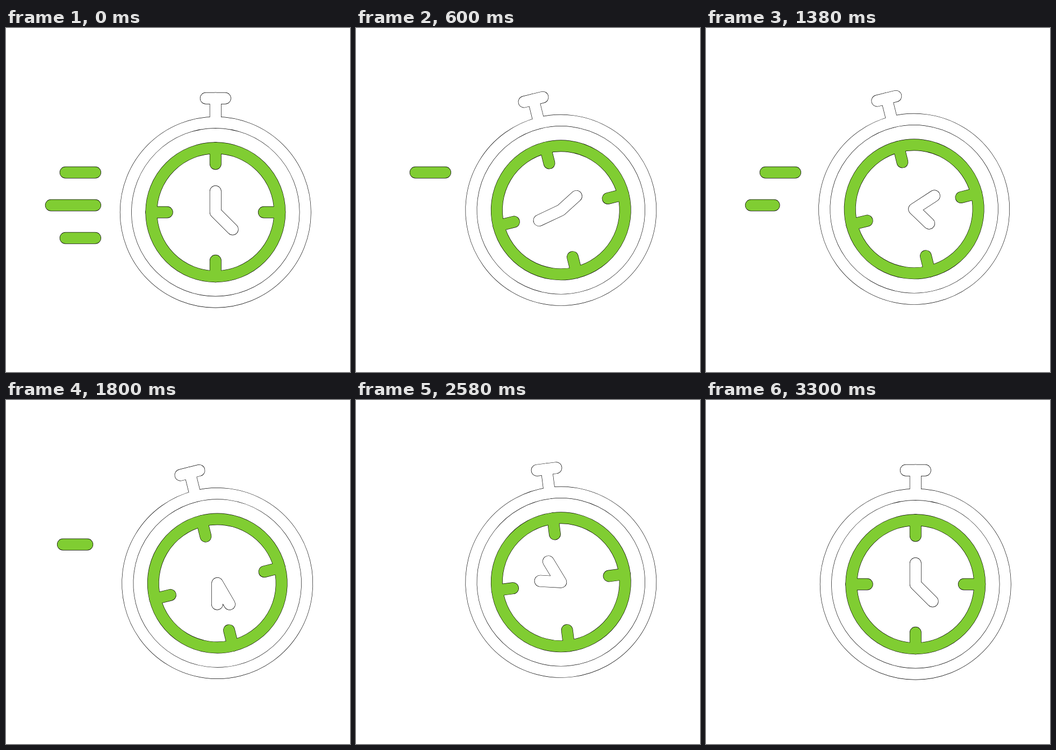
These frames come from a looping animation (640 px wide and 640 px high, 3.6 s). An HTML page with a canvas:

```html
<!DOCTYPE html>
<html lang="en">
<head>
<meta charset="utf-8">
<title>Stopwatch</title>
<style>
  html, body { margin: 0; width: 100%; height: 100%; overflow: hidden; background: #fff; }
  canvas { display: block; width: 640px; height: 640px; }
</style>
</head>
<body>
<canvas id="stage" width="640" height="640"></canvas>
<script>
const ctx = document.getElementById('stage').getContext('2d');
const LOOP = 3600, STEP = 20, TURN = Math.PI * 2;
const GREEN = '#80cd32', WHITE = '#fff', INK = '#000';
const THICK = 20.6, LINE = 0.65;
const CENTER = { x: 389.8, y: 342.7 };

// The watch rattles round four corners, eight times, from rest to rest.
const SHAKE = { start: 487, period: 330, rounds: 8 };
const CORNERS = [
  { at: 0, x: 4.2, y: -0.7 },
  { at: 0.3, x: -10.3, y: -5.6 },
  { at: 0.5, x: -1.8, y: 2.5 },
  { at: 0.8, x: -3, y: -9.7 },
  { at: 1, x: 4.2, y: -0.7 }
];
const REST = { x: 0, y: 0 };

// in: start of growth, out: start of the retreat to the left
const BAR_END = 83.7, BAR_RIGHT = 166, GROW = 80, RETREAT = 480;
const BARS = [
  { y: 268.8, left: 110.7, runs: [{ in: -GROW, out: 1714 }] },
  { y: 329.7, left: BAR_END, runs: [{ in: -GROW, out: 40 }, { in: 1000, out: 1150 }] },
  { y: 390.7, left: 110.7, runs: [{ in: -GROW, out: 100 }, { in: 1930, out: 2073 }] }
];

const clamp = v => Math.min(1, Math.max(0, v));
const mix = (a, b, p) => a + (b - a) * p;
const span = (t, a, b) => clamp((t - a) / (b - a));
const smooth = p => (1 - Math.cos(Math.PI * p)) / 2;

function shakeOffset(t) {
  const round = (t - SHAKE.start) / SHAKE.period;
  if (round <= 0 || round >= SHAKE.rounds) return REST;
  const phase = round % 1;
  const i = CORNERS.findIndex(corner => corner.at > phase);
  const first = round < 1 && i === 1;
  const last = round > SHAKE.rounds - 1 && i === CORNERS.length - 1;
  const from = first ? REST : CORNERS[i - 1];
  const to = last ? REST : CORNERS[i];
  const p = span(phase, CORNERS[i - 1].at, CORNERS[i].at);
  return { x: mix(from.x, to.x, p), y: mix(from.y, to.y, p) };
}

function line(...points) {
  const path = new Path2D();
  points.forEach(([x, y], i) => i ? path.lineTo(x, y) : path.moveTo(x, y));
  return path;
}

function ring(radius) {
  const path = new Path2D();
  path.arc(0, 0, radius, 0, TURN);
  return path;
}

// Thick strokes merged into one outlined shape.
function merged(paths, color) {
  ctx.lineCap = ctx.lineJoin = 'round';
  for (const [ink, width] of [[INK, THICK + 2 * LINE], [color, THICK]]) {
    ctx.strokeStyle = ink;
    ctx.lineWidth = width;
    paths.forEach(path => ctx.stroke(path));
  }
}

const polar = (r, degrees) => {
  const a = degrees * TURN / 360;
  return [r * Math.sin(a), -r * Math.cos(a)];
};

const CASE = [ring(167), line([0, -167], [0, -212]), line([-18, -212], [18, -212])];
const DIAL = [ring(119.5), ...[0, 90, 180, 270].map(a => line(polar(119.5, a), polar(90, a)))];

function drawBars(t) {
  for (const { y, left, runs } of BARS) {
    for (const run of runs) {
      const grown = span(t, run.in, run.in + GROW);
      const gone = span(t, run.out, run.out + RETREAT);
      if (grown === 0 || gone === 1) continue;
      const from = mix(mix(BAR_RIGHT, left, grown), BAR_END, gone);
      merged([line([from, y], [mix(BAR_RIGHT, BAR_END, gone), y])], GREEN);
    }
  }
}

function drawWatch(t) {
  const offset = shakeOffset(t);
  const tilt = -14 * smooth(span(t, 40, SHAKE.start)) * (1 - smooth(span(t, 1950, 3240)));
  const sweep = 360 * span(t, 40, 3300);

  ctx.save();
  ctx.translate(CENTER.x + offset.x, CENTER.y + offset.y);
  ctx.rotate(tilt * TURN / 360);
  merged(CASE, WHITE);
  merged(DIAL, GREEN);
  merged([line(polar(38.7, sweep), [0, 0], polar(45, 135 + 2 * sweep))], WHITE);
  ctx.restore();
}

function frame() {
  const t = Math.floor(performance.now() % LOOP / STEP) * STEP;
  ctx.fillStyle = WHITE;
  ctx.fillRect(0, 0, 640, 640);
  drawBars(t);
  drawWatch(t);
  requestAnimationFrame(frame);
}
frame();
</script>
</body>
</html>
```
